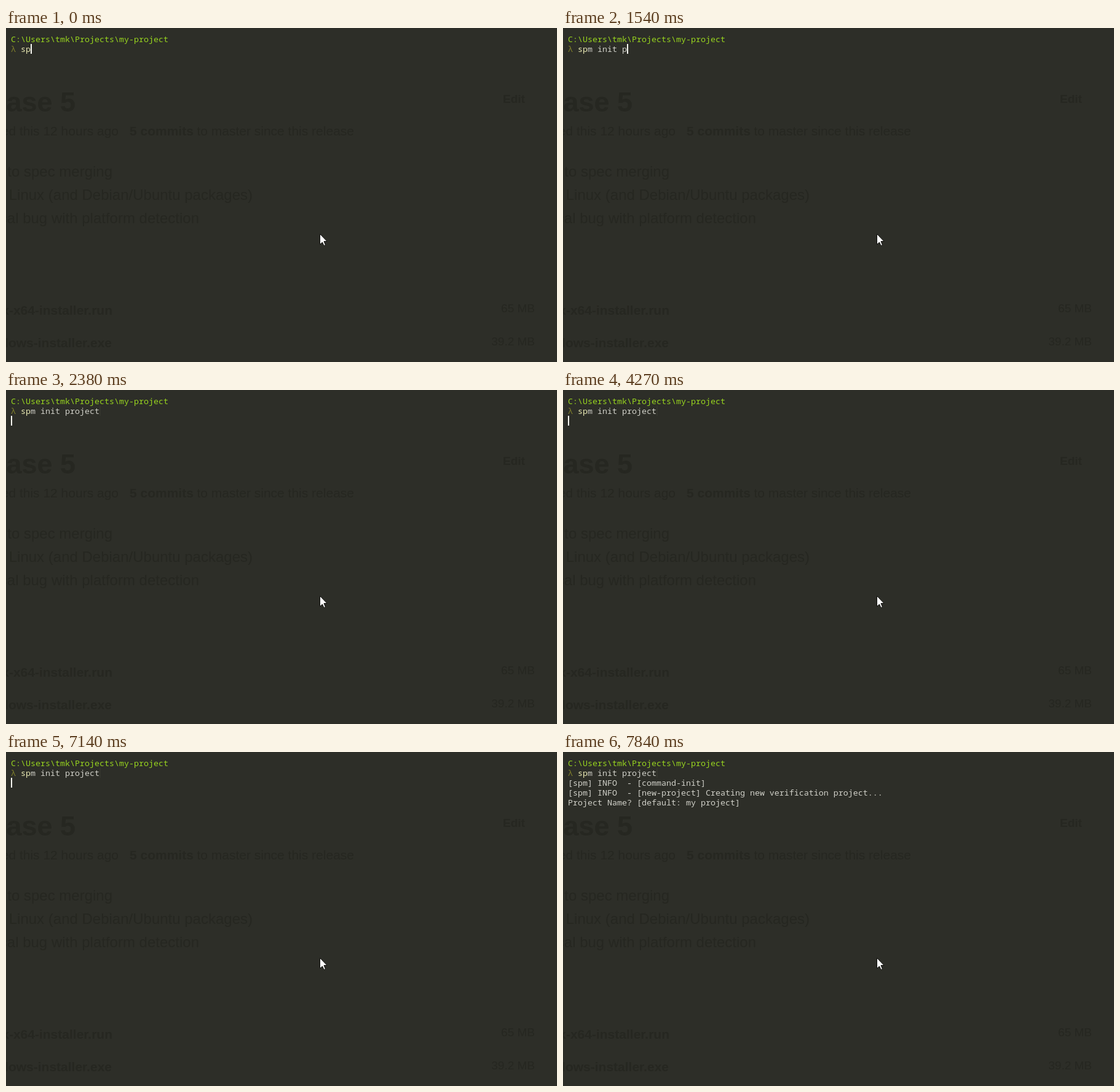
Recreate the animation shown at these times as an HTML page with a canvas. Size 896x544 px, loop 8 s.

```html
<!DOCTYPE html>
<html lang="en">
<head>
<meta charset="utf-8">
<title>Terminal session</title>
<style>
  html, body { margin: 0; width: 100%; height: 100%; overflow: hidden; background: #2d2e28; }
  canvas { display: block; }
</style>
</head>
<body>
<canvas id="stage" width="896" height="544"></canvas>
<script>
const ctx = document.getElementById('stage').getContext('2d');
const LOOP = 8000, CELL = 8, ROW = 16, LEFT = 8, BASELINE = 23;
const MONO = '13.333px "Noto Sans Mono", monospace';
const COLORS = {
  back: '#2d2e28', ghost: '#262721', path: '#98d51f', prompt: '#7d7d2b',
  typed: '#eaeab4', text: '#d0d0c8', caret: '#f8f8f2'
};

const COMMAND = 'spm init project';
const KEY_TIMES = [210, 420, 980, 1120, 1190, 1260, 1400, 1540, 1610, 1680, 1820, 1890, 2030, 2240];
const ENTER = 2380, REPLY = 7420;
const BLINKS = [840, 980, 2870, 3290, 3780, 4270, 4760, 5250, 5670, 6160, 6650, 7140, 7840];
const OUTPUT = [
  '[spm] INFO  - [command-init]',
  '[spm] INFO  - [new-project] Creating new verification project...',
  'Project Name? [default: my project] '
];

// Text of the window behind: content, x, baseline, size, weight, alignment
const GHOSTS = [
  ['Release 5', 113, 136, 45, 'bold', 'right'],
  ['Edit', 808, 122, 19, 'bold', 'left'],
  ['ed this 12 hours ago', 183, 175, 21, 'normal', 'right'],
  ['5 commits', 201, 175, 21, 'bold', 'left'],
  ['to master since this release', 566, 175, 21, 'normal', 'right'],
  ['to spec merging', 173, 242, 24, 'normal', 'right'],
  ['Linux (and Debian/Ubuntu packages)', 401, 280, 24, 'normal', 'right'],
  ['cal bug with platform detection', 314, 318, 24, 'normal', 'right'],
  ['x-x64-installer.run', 173, 467, 21, 'bold', 'right'],
  ['dows-installer.exe', 172, 520, 21, 'bold', 'right'],
  ['65 MB', 860, 463, 19, 'normal', 'right'],
  ['39.2 MB', 860, 517, 19, 'normal', 'right']
];

const countUntil = (times, t) => times.filter(time => time <= t).length;

function drawGhosts() {
  ctx.fillStyle = COLORS.ghost;
  for (const [text, x, y, size, weight, align] of GHOSTS) {
    ctx.font = `${weight} ${size}px "Liberation Sans", sans-serif`;
    ctx.textAlign = align;
    ctx.fillText(text, x, y);
  }
}

function print(text, column, row, color) {
  ctx.font = MONO;
  ctx.textAlign = 'left';
  ctx.fillStyle = color;
  ctx.fillText(text, LEFT + column * CELL, BASELINE + row * ROW);
}

function drawCaret(column, row, color = COLORS.caret) {
  ctx.fillStyle = color;
  ctx.fillRect(LEFT + column * CELL, 10 + row * ROW, 2, ROW);
}

function drawPointer() {
  ctx.beginPath();
  [[510.5, 335.5], [510.5, 352.5], [514.5, 349], [517, 354.5],
   [519.5, 353.5], [517, 347.5], [522, 347.5]].forEach(([x, y]) => ctx.lineTo(x, y));
  ctx.closePath();
  ctx.fillStyle = '#fff';
  ctx.fill();
  ctx.strokeStyle = '#11110f';
  ctx.lineWidth = 1;
  ctx.stroke();
}

function draw(t) {
  ctx.fillStyle = COLORS.back;
  ctx.fillRect(0, 0, 896, 544);
  drawGhosts();

  const typed = COMMAND.slice(0, 2 + countUntil(KEY_TIMES, t));
  print('C:\\Users\\tmk\\Projects\\my-project', 0, 0, COLORS.path);
  print('λ', 0, 1, COLORS.prompt);
  print(typed.slice(0, 2), 2, 1, COLORS.typed);
  print(typed.slice(2), 4, 1, COLORS.text);

  let column = 2 + typed.length, row = 1;
  if (t >= ENTER) {
    drawCaret(column, row, '#33342d');
    [column, row] = [0, 2];
  }
  if (t >= REPLY) {
    OUTPUT.forEach((line, i) => print(line, 0, 2 + i, COLORS.text));
    [column, row] = [OUTPUT[2].length, 4];
  }
  if (countUntil(BLINKS, t) % 2 === 0) drawCaret(column, row);
  drawPointer();
}

const start = performance.now();
function tick() {
  draw((performance.now() - start) % LOOP);
  requestAnimationFrame(tick);
}
tick();
</script>
</body>
</html>
```
